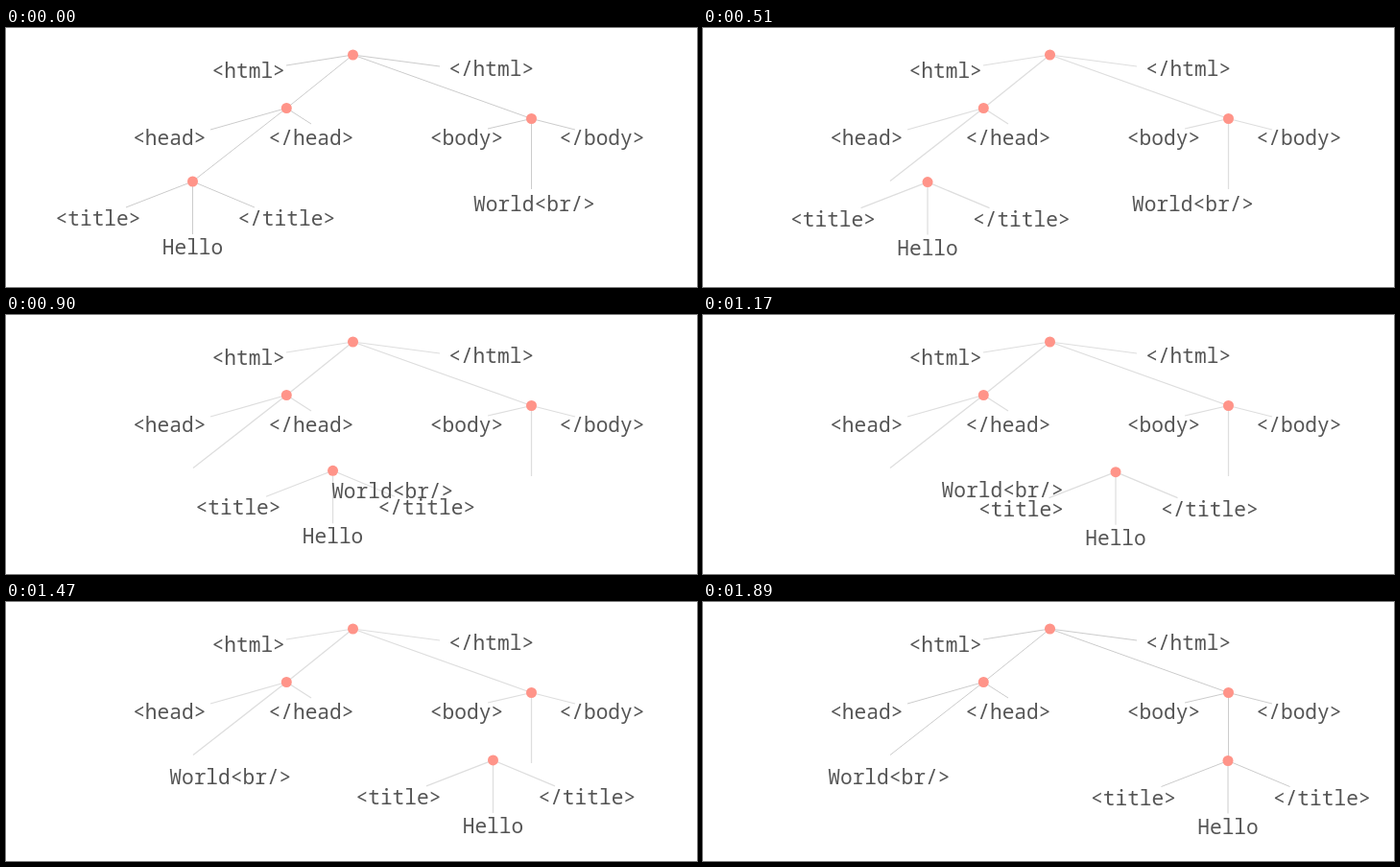
Recreate the animation shown at these times as an HTML page. Size 720x270 px, loop 2010 ms.

```html
<!DOCTYPE html>
<html lang="en">
<head>
<meta charset="utf-8">
<title>Swapping tree nodes</title>
<style>
html, body { margin: 0; height: 100%; overflow: hidden; background: #fff; }
svg { display: block; }
text { font: 21.2px "Noto Sans Mono", "DejaVu Sans Mono", monospace; fill: #555; text-anchor: middle; }
line { stroke: #ccc; }
.moving line { stroke: #dedede; stroke-width: 1.25; }
circle { fill: #ff9489; }
</style>
</head>
<body>
<svg id="stage" width="720" height="270" viewBox="0 0 720 270">
  <g id="tree"></g>
  <g id="branch"></g>
  <g id="leaf"></g>
</svg>
<script>
const LOOP = 2010, START = 90, END = 1890, STEP = 30;
const $ = id => document.getElementById(id);
const stage = $("stage"), tree = $("tree"), branch = $("branch"), leaf = $("leaf");

function add(parent, tag, attrs, content = "") {
  const el = document.createElementNS("http://www.w3.org/2000/svg", tag);
  for (const key in attrs) el.setAttribute(key, attrs[key]);
  el.textContent = content;
  parent.append(el);
}

const label = (parent, content, x, y) => add(parent, "text", { x, y }, content);

function node(parent, x, y, ends) {
  for (const [x2, y2] of ends) add(parent, "line", { x1: x, y1: y, x2, y2 });
  add(parent, "circle", { cx: x, cy: y, r: 5.5 });
}

node(tree, 361.5, 28, [[292, 39], [452, 40], [292.5, 83.5], [547.5, 94.5]]);
node(tree, 292.3, 83.5, [[213, 106], [318, 100], [195, 159.5]]);
node(tree, 547.5, 94.5, [[502, 105], [593, 106], [547.5, 168]]);
label(tree, "<html>", 252.7, 52.2);
label(tree, "</html>", 505.7, 50);
label(tree, "<head>", 170.3, 121.5);
label(tree, "</head>", 318, 121.5);
label(tree, "<body>", 480, 122);
label(tree, "</body>", 621, 122);

node(branch, 194.5, 160, [[125, 187], [259, 187], [194.5, 215]]);
label(branch, "<title>", 96, 206);
label(branch, "</title>", 292.3, 206);
label(branch, "Hello", 194.5, 236);

label(leaf, "World<br/>", 550.5, 191);

// cubic-bezier(.42, 0, .58, 1)
function easeInOut(u) {
  let lo = 0, hi = 1, s;
  for (let i = 0; i < 24; i++) {
    s = (lo + hi) / 2;
    const x = 1.26 * s * (1 - s) ** 2 + 1.74 * s * s * (1 - s) + s ** 3;
    if (x < u) lo = s; else hi = s;
  }
  return s * s * (3 - 2 * s);
}

function draw(now) {
  const t = Math.floor(now % LOOP / STEP) * STEP;
  const p = easeInOut(Math.min(1, Math.max(0, (t - START) / (END - START))));
  stage.classList.toggle("moving", t >= START && t < END);
  branch.setAttribute("transform", `translate(${352.5 * p} ${5.5 * p})`);
  leaf.setAttribute("transform", `translate(${-356.7 * p} ${-p})`);
  requestAnimationFrame(draw);
}
draw(0);
</script>
</body>
</html>
```
